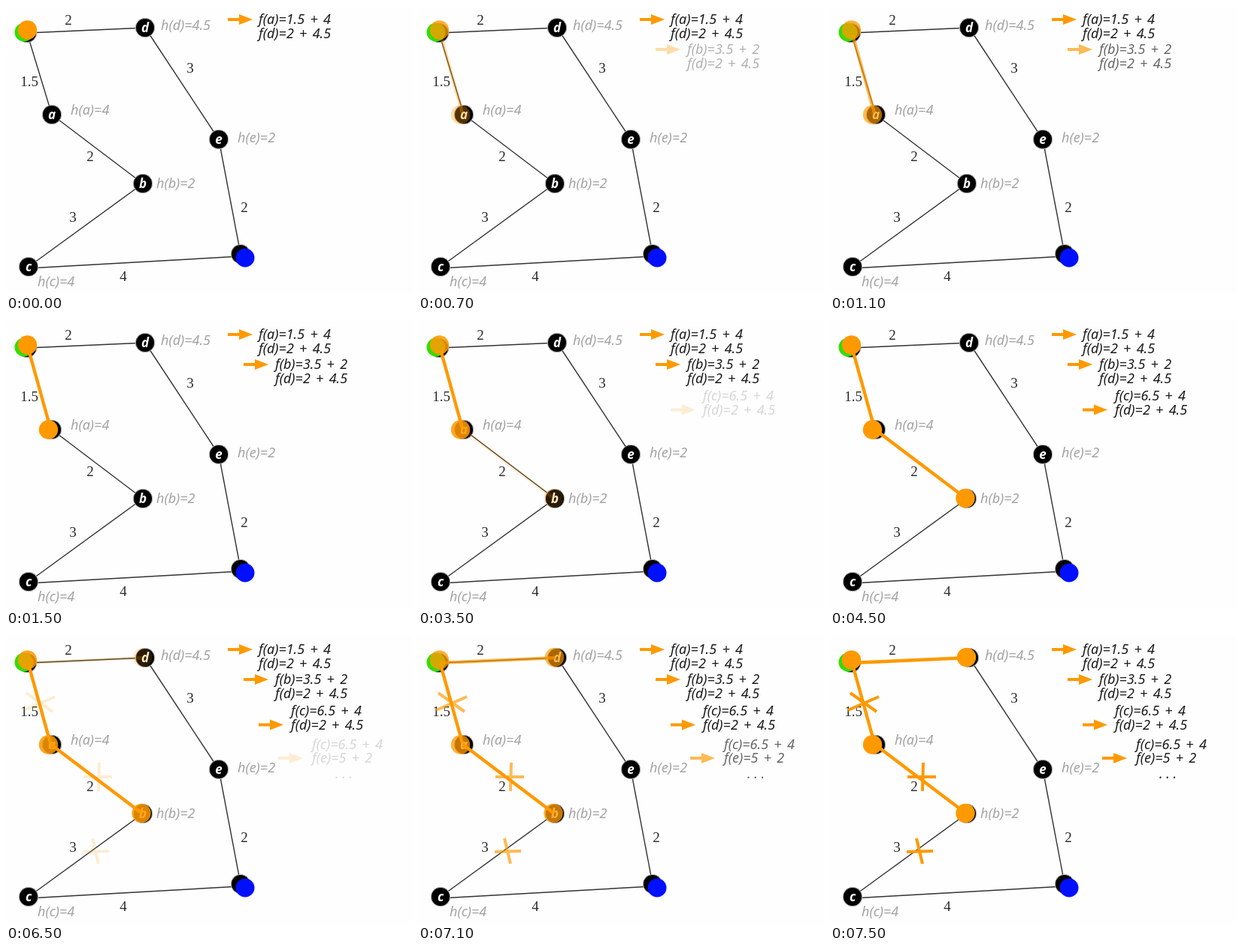
Write an HTML page that moves like this. It is 540 px wide and 383 px high and loops after 8000 ms.

```html
<!DOCTYPE html>
<html lang="en">
<head>
<meta charset="utf-8">
<title>A* search</title>
<style>
  html, body { margin: 0; width: 100%; height: 100%; overflow: hidden; background: #fefefe; }
  svg { display: block; width: 540px; height: 383px; }
  text { font: italic 18px "Noto Sans", "Open Sans", sans-serif; fill: #1a1a1a; }
  .heuristic { fill: #a3a3a3; }
  .weight { font: 19px "Liberation Serif", serif; fill: #2a2a2a; text-anchor: middle; }
  .letter { font-weight: bold; font-size: 17px; fill: #fff; text-anchor: middle; }
  .formula { word-spacing: 2.6px; }
  .edge { stroke: #333; stroke-width: 1.4; }
  .node { stroke: #bbb; stroke-width: 1; }
  .path { stroke: #ff9900; stroke-width: 4.4; }
  .cross { stroke: #ff9900; stroke-width: 4; }
  .mark, .arrow { fill: #ff9900; }
</style>
</head>
<body>
<svg id="stage" viewBox="0 0 540 383"></svg>
<script>
const LOOP = 8000, FADE_STARTS = [500, 3500, 6500], STEP = 200, STEPS = 6;
const stage = document.getElementById("stage");

function add(parent, tag, attributes, content = "") {
  const element = document.createElementNS("http://www.w3.org/2000/svg", tag);
  for (const key in attributes) element.setAttribute(key, attributes[key]);
  element.textContent = content;
  return parent.appendChild(element);
}
const line = (parent, name, [x1, y1], [x2, y2]) =>
  add(parent, "line", { class: name, x1, y1, x2, y2 });
const circle = (parent, name, cx, cy, r, fill) =>
  add(parent, "circle", { class: name, cx, cy, r, ...(fill && { fill }) });
const label = (parent, name, x, y, content) =>
  add(parent, "text", { class: name, x, y }, content);
const arrow = (parent, x, y) =>
  add(parent, "path", { class: "arrow", d: `M${x} ${y - 2}h15v-5l18 7l-18 7v-5h-15z` });

// Graph
const nodes = {
  start: [28, 36], a: [61, 145], b: [182, 237], c: [30, 348],
  d: [185, 29], e: [283, 178], goal: [312, 331]
};
const edges = [["start", "d"], ["start", "a"], ["a", "b"], ["b", "c"], ["d", "e"], ["e", "goal"]];
for (const [from, to] of edges) line(stage, "edge", nodes[from], nodes[to]);
line(stage, "edge", [30, 350], [312, 334]);

for (const [x, y, value] of [
  [83, 25, "2"], [31, 107, "1.5"], [245, 89, "3"], [112, 207, "2"],
  [89, 288, "3"], [317, 275, "2"], [156, 367, "4"]
]) label(stage, "weight", x, y, value);

for (const name in nodes) {
  const [x, y] = nodes[name];
  circle(stage, "node", x, y, 12.7);
  if (name.length === 1) label(stage, "letter", x, y + 5.5, name);
}
circle(stage, "", 24, 35, 12.5, "#33dd00");
circle(stage, "", 318, 336, 12.5, "#0010ff");

for (const [x, y, content] of [
  [206, 32, "h(d)=4.5"], [86, 145, "h(a)=4"], [308, 182, "h(e)=2"],
  [200, 243, "h(b)=2"], [42, 374, "h(c)=4"]
]) label(stage, "heuristic", x, y, content);

// Search stages: each adds a path segment, a visited mark and two formulas
const stages = [
  { mark: [28.5, 32], arrow: [295, 18], rows: [[336, 24, "f(a)=1.5 + 4"], [336, 43, "f(d)=2 + 4.5"]] },
  { mark: [56.5, 145], path: [[30, 38], [59, 143]], arrow: [316, 58],
    rows: [[358, 64, "f(b)=3.5 + 2"], [358, 83, "f(d)=2 + 4.5"]] },
  { mark: [180, 236.5], path: [[60, 145], [180, 236]], arrow: [336, 118.5],
    rows: [[379, 106, "f(c)=6.5 + 4"], [379, 125, "f(d)=2 + 4.5"]] },
  { mark: [181.5, 28.5], path: [[28, 36], [183, 29]], arrow: [362, 163],
    rows: [[407, 151, "f(c)=6.5 + 4"], [407, 169, "f(e)=5 + 2"]],
    crosses: [[[27, 76], [62, 101]], [[24, 99], [65, 81]], [[103, 188], [141, 188]],
      [[124, 169], [123, 207]], [[102, 288], [137, 287]], [[115, 270], [123, 304]]] }
];
const groups = stages.map(() => add(stage, "g", {}));
const marks = stages.map((item, i) => {
  const group = groups[i];
  if (item.path) line(group, "path", ...item.path);
  for (const ends of item.crosses || []) line(group, "cross", ...ends);
  arrow(group, ...item.arrow);
  for (const row of item.rows) label(group, "formula", ...row);
  return circle(stage, "mark", ...item.mark, 12.7);
});
label(groups[3], "ellipsis", 438, 190, ". . .");

function render(time) {
  const fades = FADE_STARTS.map(start =>
    Math.max(0, Math.min(STEPS, Math.floor((time - start) / STEP) + 1)) / STEPS);
  stages.forEach((_, i) => {
    const shown = i ? fades[i - 1] : 1;
    groups[i].setAttribute("opacity", shown);
    // Visited marks cross-fade with themselves during later stages
    const opacity = fades.slice(i).reduce((alpha, p) => alpha * (1 - p * (1 - p)), shown);
    marks[i].setAttribute("opacity", opacity);
  });
}

const begin = performance.now();
function tick() {
  render((performance.now() - begin) % LOOP);
  requestAnimationFrame(tick);
}
tick();
</script>
</body>
</html>
```
